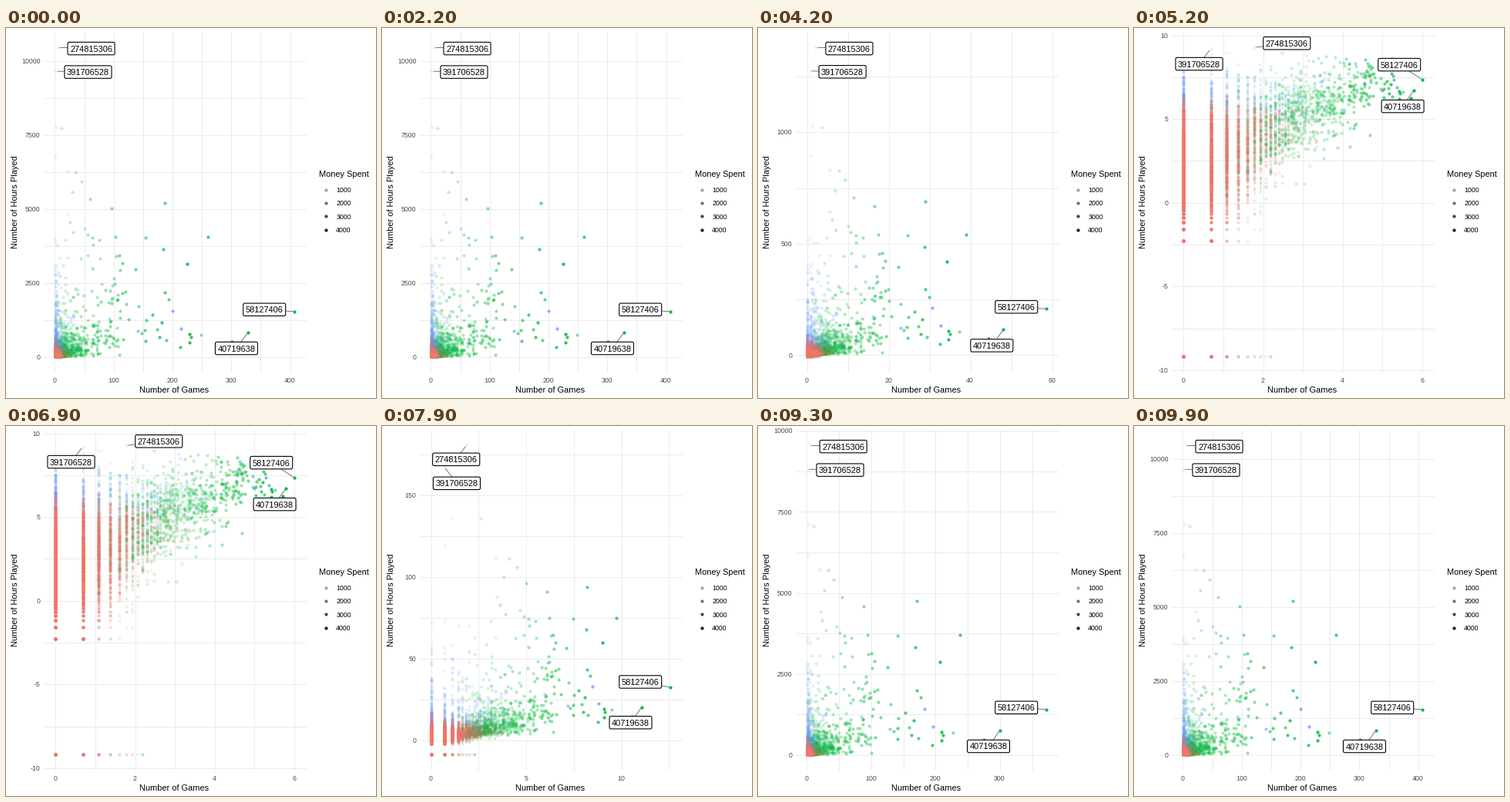
Animation of 480x480 px, one loop 10 s. Source, as a matplotlib script:

```python
import numpy as np
import matplotlib.pyplot as plt
from matplotlib.animation import FuncAnimation
from matplotlib.colors import to_rgba
from matplotlib.patches import FancyBboxPatch

plt.rcParams["font.family"] = "Liberation Sans"

SIZE, DPI = 480, 80
PX = 72 / DPI                      # points per pixel
LEFT, RIGHT, TOP, BOTTOM = 49, 389, 5, 446
X0, X1, Y0, Y1 = 63.7, 374.2, 426.3, 25.3
GREEN, BLUE, RED = "#00BA38", "#619CFF", "#F8766D"
COLOURS = [GREEN, BLUE, RED]

fig = plt.figure(figsize=(SIZE / DPI, SIZE / DPI), dpi=DPI, facecolor="white")
ax = fig.add_axes([0, 0, 1, 1])
ax.set(xlim=(0, SIZE), ylim=(SIZE, 0))
ax.axis("off")

# ---------------------------------------------------------------- data
TAGGED = [(6, 10453), (2, 9650), (408, 1525), (329, 820)]
BIG = [(12, 7730), (36, 6240), (46, 5930), (30, 5570), (60, 5330),
       (97, 5020), (187, 5200), (261, 4055), (155, 4030), (103, 4055),
       (185, 3640), (226, 3140), (105, 3400), (110, 3430), (138, 2960),
       (187, 2180), (194, 1940), (229, 770), (232, 665), (229, 480),
       (249, 740), (214, 330), (302, 500), (121, 2200), (143, 1700),
       (167, 1420), (182, 1160), (174, 925), (178, 665), (190, 560),
       (155, 535), (154, 900), (156, 1240), (148, 795), (122, 1790),
       (126, 1270), (117, 585), (94, 2230), (56, 4130), (64, 4030),
       (51, 4340), (32, 4210), (26, 4550), (57, 3430), (65, 3790)]
COOL = [(3, 7780), (2, 6750), (22, 6270), (200, 1550), (215, 950),
        (142, 870), (99, 2410), (23, 4840)]


def make_players(n=9000):
    rng = np.random.default_rng(14)
    games = np.floor(1 / (1 - rng.random(n)))
    games = games[games < 118]
    n = len(games)
    lx = np.log(games)
    mean = 1.4 + 1.55 * lx - 0.075 * lx ** 2
    ly = mean + np.maximum(0.85, 2.3 - 0.4 * lx) * rng.standard_normal(n)
    ly -= (rng.random(n) < 0.12) * 2.5 * rng.random(n)
    ly = np.where(ly > 8.3, 8.3 - 2 * rng.random(n), ly)
    hours = np.maximum(0.1, np.round(np.exp(ly), 1))
    hours[rng.random(n) < 0.05 / (games + 1)] = 1e-4

    green = (games > 1) & (rng.random(n) < 1 / (1 + np.exp((2.2 - lx) / 0.5)))
    blue = ly + 0.4 * rng.standard_normal(n) > 6 - 0.2 * lx
    blue |= (games > 2) & (rng.random(n) < 0.06)
    group = np.where(green, 0, np.where(blue, 1, 2))

    extra = np.array(TAGGED + BIG + COOL, float)
    tags = [0, 1, 0, 0] + [0] * len(BIG) + [1] * len(COOL)
    games = np.r_[games, extra[:, 0]]
    hours = np.r_[hours, extra[:, 1]]
    group = np.r_[group, tags]
    price = rng.uniform(0.75, 1.25, len(games))
    alpha = 0.1 + 0.9 * np.minimum(1, games * price / 330)
    alpha[games == 249] = 0.4
    alpha[games > 300] = 1
    return games, hours, group, np.maximum(0.1, np.round(alpha * 20) / 20)


games, hours, group, alpha = make_players()
log_games, log_hours = np.log(games), np.log(hours)
first_tag = len(games) - len(TAGGED) - len(BIG) - len(COOL)


def dots(colour, a):
    rgba = to_rgba(colour, a)
    return ax.plot([], [], "o", ms=3.3 * PX, mew=0.9 * PX,
                   mfc=rgba, mec=rgba, zorder=2)[0]


# Interleave the colours in a few passes so that they blend.
PASSES = 3
layers = []
turn = np.arange(len(games)) % PASSES
for p in range(PASSES):
    for c, colour in enumerate(COLOURS):
        for a in np.unique(alpha[group == c]):
            pick = np.flatnonzero((turn == p) & (group == c) & (alpha == a))
            if len(pick):
                layers.append((dots(colour, a), pick))


# ---------------------------------------------------------------- axes
def nice_breaks(lo, hi, m=5):
    """Extended Wilkinson tick positions; returns (step, ticks)."""
    best, found = -9, None
    steps = [1, 5, 2, 2.5, 4, 3]
    top = int(np.ceil(np.log10(hi - lo)))
    for i, q in enumerate(steps):
        for z in range(top - 2, top + 1):
            step = q * 10.0 ** z
            for k in range(2, 11):
                start = int(np.floor(hi / step)) - k + 1
                stop = int(np.ceil(lo / step))
                for s in range(start, stop + 1):
                    a, b = s * step, (s + k - 1) * step
                    simple = 1 - i / 5 - 1 + (a <= 0 <= b)
                    cover = 1 - 0.5 * ((hi - b) ** 2 + (lo - a) ** 2) \
                        / (0.1 * (hi - lo)) ** 2
                    r = (k - 1) / (b - a)
                    rt = (m - 1) / (max(b, hi) - min(a, lo))
                    dense = 2 - max(r / rt, rt / r)
                    score = 0.25 * simple + 0.2 * cover + 0.5 * dense
                    if score > best:
                        best, found = score, (step, np.arange(s, s + k) * step)
    return found


def text(x, y, s="", size=8.8, colour="#4D4D4D", ha="center", **kw):
    return ax.text(x, y, s, fontsize=size * PX, color=colour, ha=ha,
                   va="baseline", **kw)


grid, = ax.plot([], [], color="#EBEBEB", lw=PX, zorder=1)
x_ticks = [text(0, 459.8) for _ in range(10)]
y_ticks = [text(44.3, 0, ha="right") for _ in range(10)]

text(218.5, 472.6, "Number of Games", 11, "black")
text(15.2, 225.5, "Number of Hours Played", 11, "black",
     rotation=90, rotation_mode="anchor")
text(406, 193, "Money Spent", 11, "black", "left")
for i in range(4):
    y = 210 + 17.2 * i
    dots("black", 0.29 + 0.187 * i).set_data([414.5], [y])
    text(428.3, y + 3.3, str(1000 * (i + 1)), 8.8, "black", "left")


def scale(v, lo, hi, p0, p1):
    return p0 + (v - lo) / (hi - lo) * (p1 - p0)


def set_axis(lo, hi, p0, p1, labels, vertical):
    """Place the tick labels, return pixel positions of all grid lines."""
    pad = 0.05 * (hi - lo)
    step, ticks = nice_breaks(lo - pad, hi + pad)
    fmt = "%d" if step == round(step) else "%.1f"
    inside = [t for t in ticks if lo - pad <= t <= hi + pad]
    for i, label in enumerate(labels):
        label.set_visible(i < len(inside))
        if i < len(inside):
            pos = scale(inside[i], lo, hi, p0, p1)
            label.set_text(fmt % inside[i])
            if vertical:
                label.set_y(pos + 3.6)
            else:
                label.set_x(pos)
    half = step / 2
    lines = np.arange(np.ceil((lo - pad) / half),
                      np.floor((hi + pad) / half) + 1) * half
    return np.floor(scale(lines, lo, hi, p0, p1)) + 0.5


# ---------------------------------------------------------------- labels
KEYS = [0, 0.16, 0.32]
OFFSETS = {
    "274815306": ([42, -13, 43], [-5.5, 18, 1.3]),
    "391706528": ([-15, 16, 42], [19.5, 21, 1]),
    "58127406": ([-30, -39, -39], [-19.5, -7, -2.5]),
    "40719638": ([-14.5, -14.5, -15], [21, 20, 20.7]),
}


class Tag:
    def __init__(self, name, index):
        self.dx, self.dy = OFFSETS[name]
        self.index = index
        self.w, self.h = 3.06 * len(name) + 3, 8.2
        self.line, = ax.plot([], [], color="#555555", lw=0.8 * PX, zorder=3)
        self.box = FancyBboxPatch((0, 0), 2 * self.w, 2 * self.h,
                                  boxstyle="round,pad=0,rounding_size=2",
                                  fc="white", ec="black", lw=1.1 * PX, zorder=4)
        ax.add_patch(self.box)
        self.text = text(0, 0, name, 11, "black", zorder=5)

    def place(self, px, py, u):
        dx, dy = np.interp(u, KEYS, self.dx), np.interp(u, KEYS, self.dy)
        cx, cy = px + dx, py + dy
        self.box.set_x(cx - self.w)
        self.box.set_y(cy - self.h)
        self.text.set_position((cx, cy + 4))
        edge = 1 - 1 / max(abs(dx) / self.w, abs(dy) / self.h, 1)
        gap = min(edge, 2.5 / np.hypot(dx, dy))
        self.line.set_data([px + gap * dx, px + edge * dx],
                           [py + gap * dy, py + edge * dy])


tags = [Tag(name, first_tag + i) for i, name in enumerate(OFFSETS)]


# ---------------------------------------------------------------- motion
def ease(u):
    return 4 * u ** 3 if u < 0.5 else 1 - 4 * (1 - u) ** 3


def draw(frame):
    u = np.interp(frame, [0, 25, 50, 75, 100], [1, 1, 0, 0, 1])
    a = ease(u)
    x = a * games + (1 - a) * log_games
    y = a * hours + (1 - a) * log_hours
    xr, yr = (x.min(), x.max()), (y.min(), y.max())
    px, py = scale(x, *xr, X0, X1), scale(y, *yr, Y0, Y1)

    gx = set_axis(*xr, X0, X1, x_ticks, False)
    gy = set_axis(*yr, Y0, Y1, y_ticks, True)
    xs, ys = [], []
    for g in gx:
        xs += [g, g, np.nan]
        ys += [TOP, BOTTOM, np.nan]
    for g in gy:
        xs += [LEFT, RIGHT, np.nan]
        ys += [g, g, np.nan]
    grid.set_data(xs, ys)

    for line, pick in layers:
        line.set_data(px[pick], py[pick])
    for tag in tags:
        tag.place(px[tag.index], py[tag.index], u)
    return []


anim = FuncAnimation(fig, draw, frames=100, interval=100, repeat=True,
                     repeat_delay=0, init_func=lambda: [])
plt.show()
```
